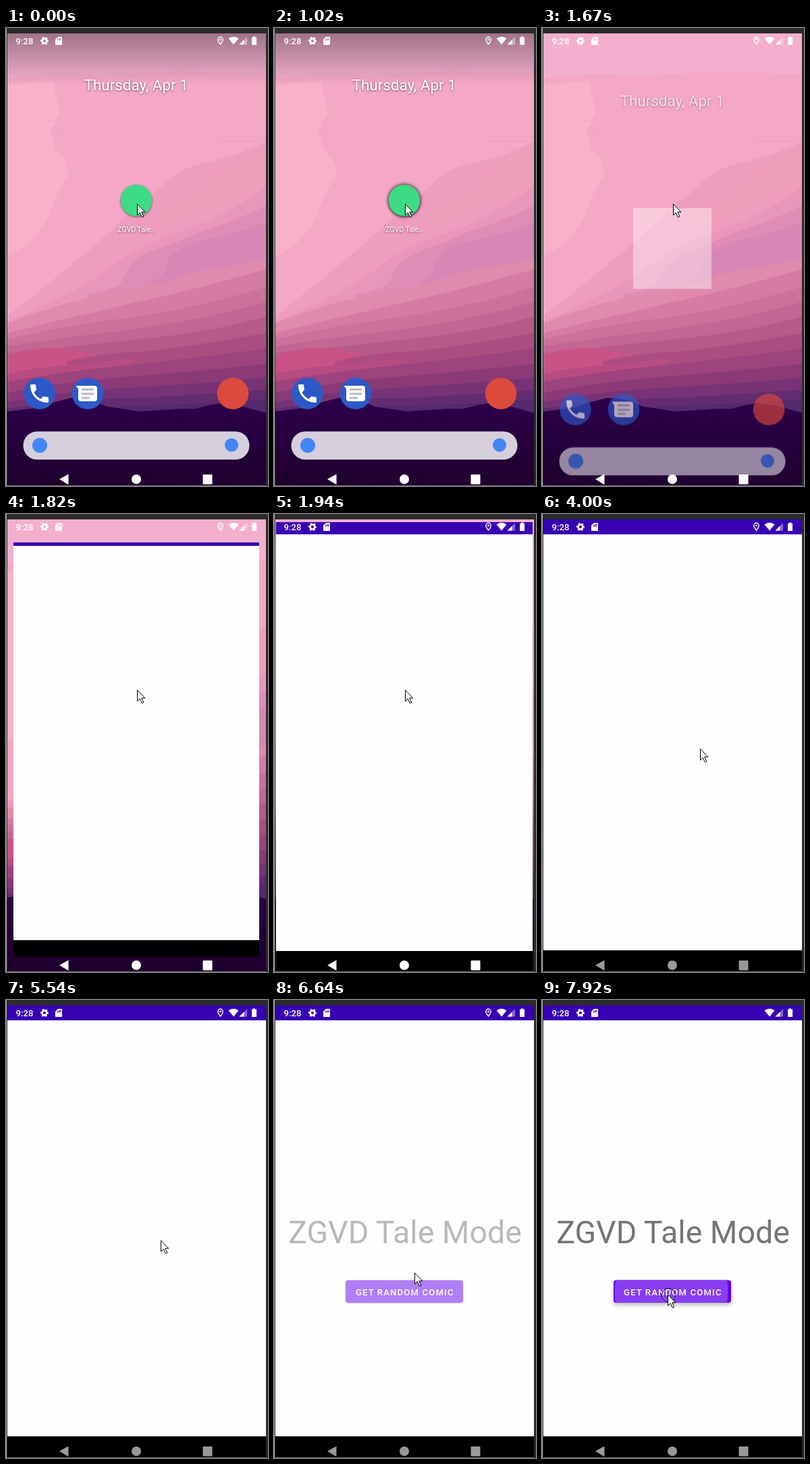
Animation, 388 px wide and 676 px high, one loop 8000 ms. Source, as an HTML page:

```html
<!DOCTYPE html>
<html lang="en">
<head>
<meta charset="utf-8">
<title>App launch</title>
<style>
html, body { margin: 0; width: 100%; height: 100%; overflow: hidden; background: #2b2b2b; }
#stage { position: relative; width: 388px; height: 676px; overflow: hidden; }
svg { position: absolute; left: 0; top: 0; }
text { font-family: Roboto, Arial, sans-serif; white-space: pre; }

/* Every change is a hard cut on one 8 s clock: 1% = 80 ms. */
.step { animation: 8s step-end infinite; }

#window {
  position: absolute; box-sizing: border-box; background: #fefefe; opacity: 0;
  border: 0 solid #3700b3; border-bottom-color: #000;
  animation-name: open;
}
@keyframes open {
  0%      { opacity: 0; }
  20.875% { opacity: .4; left: 135px; top: 266px; width: 116px; height: 119px; border-width: 0; }
  22.75%  { opacity: 1; left: 11px; top: 42px; width: 364px; height: 612px; border-width: 5px 0 25px; }
  24.25%  { opacity: 1; left: 3px; top: 12px; width: 380px; height: 663px; border-width: 18px 0 30px; }
  31.125% { opacity: 1; left: 2px; top: 8px; width: 383px; height: 667px; border-width: 22px 0 31px; }
}

#scrim, #icon { animation-name: untilLaunch; }
@keyframes untilLaunch { 0% { opacity: 1; } 20.875% { opacity: 0; } }

#press { opacity: 0; filter: blur(2px); animation-name: press; }
@keyframes press { 0% { opacity: 0; } 12.75% { opacity: .5; } 20.875% { opacity: 0; } }

#home { animation-name: home; }
@keyframes home {
  0%      { opacity: 1; transform: none; }
  20.875% { opacity: .65; transform: translateY(23.5px); }
  22.75%  { opacity: 0; }
}

#nav { fill: #fff; animation-name: dim; }
@keyframes dim { 0% { fill: #fff; } 45% { fill: #ddd; } 46.5% { fill: #bbb; } 48.125% { fill: #999; } }

#content { opacity: 0; animation-name: content; }
@keyframes content { 0% { opacity: 0; } 83% { opacity: .5; } 84.875% { opacity: 1; } }

#ripple { opacity: 0; animation-name: ripple; }
@keyframes ripple { 0% { opacity: 0; } 99% { opacity: 1; } }

#button { animation-name: lift; }
@keyframes lift {
  0%  { filter: drop-shadow(0 1px 1px #0005); }
  99% { filter: drop-shadow(0 3px 3px #0004); }
}

#pin { animation-name: pin; }
@keyframes pin { 0% { opacity: 1; } 86.75% { opacity: 0; } }

#ring { opacity: 0; animation-name: click; }
@keyframes click {
  0% { opacity: 0; } 8.125% { opacity: 1; } 9.625% { opacity: 0; } 97.125% { opacity: 1; }
}

#cursor { animation-name: move; }
@keyframes move {
  0%      { transform: translate(194px, 259px); }
  29.25%  { transform: translate(198px, 266px); }
  31.125% { transform: translate(218px, 320px); }
  33%     { transform: translate(241px, 382px); }
  45%     { transform: translate(240px, 374px); }
  46.5%   { transform: translate(237px, 356px); }
  48.125% { transform: translate(235px, 346px); }
  50%     { transform: translate(234px, 346px); }
  69.25%  { transform: translate(229px, 354px); }
  70.75%  { transform: translate(226px, 361px); }
  72.625% { transform: translate(220px, 381px); }
  74.5%   { transform: translate(214px, 387px); }
  76.375% { transform: translate(210px, 396px); }
  77.875% { transform: translate(208px, 402px); }
  90.25%  { transform: translate(198px, 420px); }
  91.75%  { transform: translate(186px, 432px); }
  93.625% { transform: translate(186px, 434px); }
}

.shade { filter: drop-shadow(0 1px 1.5px #0008); }
</style>
</head>
<body>
<div id="stage">
  <svg width="388" height="676">
    <defs>
      <linearGradient id="fade" x2="0" y2="1">
        <stop stop-color="#000" stop-opacity=".34"/>
        <stop offset="1" stop-color="#000" stop-opacity="0"/>
      </linearGradient>
      <linearGradient id="ground" x2="0" y2="1">
        <stop stop-color="#2d004c"/>
        <stop offset="1" stop-color="#1f002e"/>
      </linearGradient>
    </defs>

    <!-- wallpaper -->
    <path fill="#f4afcf" d="M2 8H385V676H2z"/>
    <path fill="#f4a8c6" d="M2 74L80 67 140 70 260 64 385 68V676H2z"/>
    <path fill="#f9b1ca" d="M2 84L70 78Q73 100 80 126L66 150 72 178Q96 200 92 218 72 248 62 280 40 322 2 336z"/>
    <path stroke="#eda0c0" d="M57 136h24M64 148h24M64 157h17M70 168h17M335 143h50M322 152h63M312 160h73M318 168h67M312 177h50"/>
    <path fill="#ef9dbf" d="M2 425Q60 380 130 322 195 262 230 236 250 208 290 200 340 190 385 168V676H2z"/>
    <path fill="#f09fbb" d="M228 268Q290 250 305 225 325 195 385 182V232Q310 262 228 292z"/>
    <path fill="#e996bb" d="M2 434Q80 400 135 368 180 328 250 304 325 280 385 232V676H2z"/>
    <path fill="#df8cb6" d="M120 394Q165 385 172 374 180 344 215 330 250 318 290 300 340 285 385 262V676H120z"/>
    <path fill="#d886b5" d="M205 384Q238 364 238 348 243 325 300 312 350 302 385 286V676H205z"/>
    <path fill="#e08bad" d="M2 436Q70 408 150 393 230 380 270 362L385 342 385 400 2 450z"/>
    <path fill="#d67ba4" d="M2 450Q90 428 180 408 280 386 385 356V676H2z"/>
    <path fill="#cd709b" d="M2 460Q80 440 180 428 290 412 385 382V676H2z"/>
    <path fill="#c46693" d="M2 470Q90 456 180 446 290 432 385 404V676H2z"/>
    <path fill="#b75a89" d="M2 480Q100 470 190 460 300 450 385 426V676H2z"/>
    <path fill="#c95387" d="M2 482Q50 468 92 474L140 484 100 496 50 508 2 520z"/>
    <path fill="#ac4d82" d="M90 492Q150 478 210 477 300 466 385 450V676H90z"/>
    <path fill="#b84c82" d="M2 510Q60 498 120 496L200 486 170 504 2 526z"/>
    <path fill="#9d437d" d="M2 522Q80 508 160 500 290 486 385 473V676H2z"/>
    <path fill="#8b3a77" d="M2 538Q90 522 190 514 290 506 385 496V676H2z"/>
    <path fill="#773376" d="M2 552Q100 534 200 530 300 524 385 516V676H2z"/>
    <path fill="#632c71" d="M2 562Q100 546 200 546 300 540 385 534V676H2z"/>
    <path fill="#55296e" d="M130 560Q220 556 300 554L385 548V676H130z"/>
    <path fill="url(#ground)" d="M2 566L26 563 50 560 72 552 96 546 114 547 134 552 150 559 172 562 196 566 226 564 258 562 280 562 300 557 318 554 345 557 385 568V676H2z"/>
    <path id="scrim" class="step" fill="url(#fade)" d="M2 8H385V84H2z"/>

    <g id="home" class="step">
      <text class="shade" x="192.700" y="92" font-size="22.4" text-anchor="middle" fill="#fff">Thursday, Apr 1</text>
      <g id="icon" class="step">
        <circle id="press" class="step" cx="193" cy="254.5" r="25"/>
        <circle class="shade" cx="193" cy="254.5" r="23.3" fill="#3ddc84"/>
        <text class="shade" x="193" y="301" font-size="11" letter-spacing="-.25" text-anchor="middle" fill="#fff">ZGVD Tale…</text>
      </g>
      <g fill="#2c59c8">
        <circle cx="49.5" cy="539.5" r="23.3"/>
        <circle cx="121" cy="539.5" r="23.3"/>
      </g>
      <path fill="#fff" transform="translate(31.5 521.5) scale(1.5)" d="M20 15.5c-1.2 0-2.4-.2-3.6-.6-.3-.1-.7 0-1 .3l-2.2 2.2c-2.8-1.5-5.1-3.8-6.6-6.6l2.2-2.2c.3-.3.4-.7.2-1C8.7 6.5 8.5 5.2 8.5 4c0-.6-.4-1-1-1H4c-.6 0-1 .4-1 1 0 9.4 7.6 17 17 17 .6 0 1-.4 1-1v-3.5c0-.6-.4-1-1-1z"/>
      <path fill="#fff" d="M103.500 528H131q4 0 4 4V547q0 4-4 4H111q-4 0-4-4V533z"/>
      <path stroke="#b9bbc2" stroke-width="3" d="M112 533.5h18M112 540h18M112 546h12"/>
      <circle cx="336" cy="539.5" r="23.3" fill="#db4a3c"/>
      <rect x="25.500" y="595.500" width="335" height="41.500" rx="20.7" fill="#d5cfdb"/>
      <g fill="#4285f4">
        <circle cx="50" cy="616" r="11"/>
        <circle cx="334" cy="615.5" r="10"/>
      </g>
    </g>
  </svg>

  <div id="window" class="step"></div>

  <svg width="388" height="676">
    <defs>
      <clipPath id="face"><rect x="106" y="413.5" width="174" height="33.5" rx="4"/></clipPath>
    </defs>

    <g id="content" class="step">
      <text x="194" y="359" font-size="46.5" text-anchor="middle" fill="#757575">ZGVD Tale Mode</text>
      <rect id="button" class="step" x="106" y="413.5" width="174" height="33.5" rx="4" fill="#6200ee"/>
      <g clip-path="url(#face)">
        <circle id="ripple" class="step" cx="191.5" cy="431" r="84" fill="#883df2"/>
      </g>
      <text x="120.900" y="435.5" font-size="13.1" font-weight="500" letter-spacing="1.17" fill="#fff">GET RANDOM COMIC</text>
    </g>

    <!-- status bar -->
    <g fill="#fff">
      <text x="14.5" y="24" font-size="13.2" font-weight="500">9:28</text>
      <g fill="none" stroke="#fff">
        <circle cx="57" cy="19" r="3.4" stroke-width="2.6"/>
        <circle cx="57" cy="19" r="5.2" stroke-width="1.6" stroke-dasharray="2.9 2.545" stroke-dashoffset="1.45"/>
      </g>
      <path fill-rule="evenodd" d="M77 13h5q1 0 1 1v10q0 1-1 1h-8q-1 0-1-1v-7zM76 16v2.5h1.2V16zM78.2 15v3.5h1.2V15zM80.3 15v3.5h1.2V15z"/>
      <g id="pin" class="step">
        <path fill="none" stroke="#fff" stroke-width="1.4" d="M317.5 24C315 21 313.800 19 313.800 17a3.7 3.7 0 0 1 7.4 0C321.200 19 320 21 317.500 24z"/>
        <circle cx="317.5" cy="17" r="1.5"/>
      </g>
      <path d="M329.5 15.5Q337 10 344.500 15.5L337 24.5z"/>
      <path opacity=".4" d="M357 13V24.5H345.500z"/>
      <path d="M352.500 17.5V24.5H345.500z"/>
      <path d="M366 12.5h3v1.3h2V25h-7V13.800h2z"/>
    </g>

    <g id="nav" class="step">
      <path d="M79 666L92.500 658.500V674z"/>
      <circle cx="193" cy="666" r="7"/>
      <rect x="291.500" y="659" width="14" height="14.5" rx="1"/>
    </g>

    <!-- emulator frame -->
    <path fill="#2b2b2b" d="M0 0H388V8H0zM0 8H2V676H0zM385 8H388V676H385z"/>
    <path fill="#777" d="M2 675H385V676H2z"/>
    <path fill="#b0b0b0" d="M0 0H1V676H0z"/>

    <g id="cursor" class="step">
      <g id="ring" class="step" fill="none">
        <circle cx="1.5" cy="1.5" r="8.8" stroke="#fff" stroke-opacity=".6"/>
        <circle cx="1.5" cy="1.5" r="9.8" stroke="#000"/>
      </g>
      <path fill="#fff" stroke="#000" d="M.5.8V17.300l3.800-3.700 3 6.700 2.500-1.100-3-6.500H11.800z"/>
    </g>
  </svg>
</div>
</body>
</html>
```
